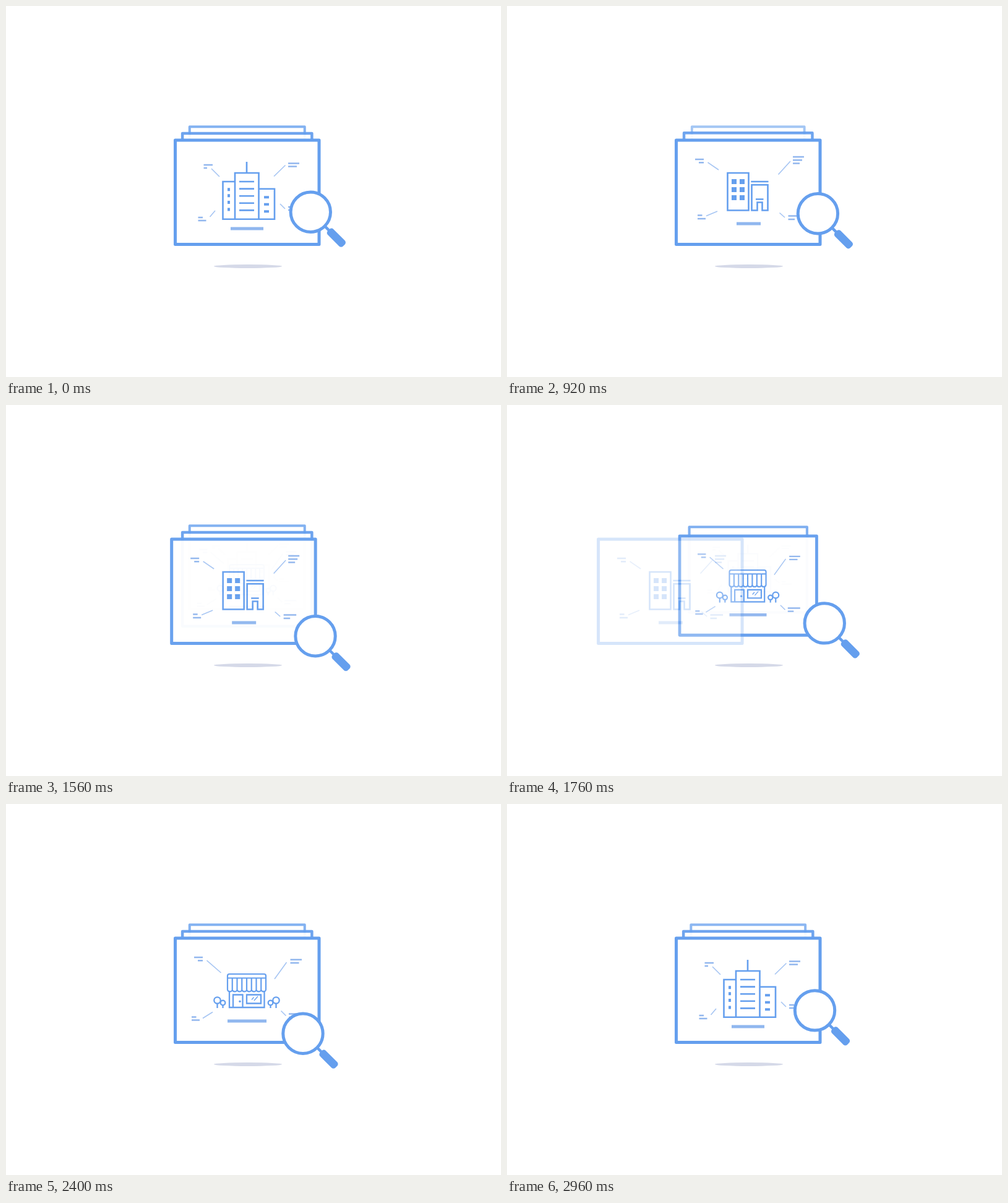
Write an HTML page that moves like this. It is 800 by 600 pixels and loops after 3000 ms.

```html
<!DOCTYPE html>
<html lang="en">
<head>
<meta charset="utf-8">
<title>Browsing cards</title>
<style>
  html, body { margin: 0; width: 100%; height: 100%; overflow: hidden; background: #fff; }
  svg { display: block; }
  .ink { fill: none; stroke: #659fee; stroke-width: 2.6; }
  .fill { fill: #659fee; stroke: none; }
  .label { stroke: #92b7ee; stroke-width: 2.5; }
  .lead { stroke: #a6c5f3; stroke-width: 1.6; }
  .bar { stroke: #90b7ef; stroke-width: 5; }
</style>
</head>
<body>
<svg width="800" height="600" viewBox="0 0 800 600" class="ink">
  <defs>
    <path id="frame" d="M273.5 217H506V385.5H273.5Z" fill="#fff" stroke-width="5" stroke-linejoin="round"/>

    <g id="scene0">
      <path d="M370 284H350.5V344.7H434V295.7H408.5M370 344.7V270H408.5V344.7M389 252V270"/>
      <path d="M377 284h24m-24 11.6h24m-24 11.6h24m-24 11.6h24m-24 11.6h24"/>
      <path d="M360 294.3v5m0 5v5m0 5.7v5m0 6.5v5" stroke-width="4"/>
      <path d="M417 309.2h8m-8 11.5h8m-8 11.6h8" stroke-width="4"/>
      <path class="bar" d="M363 360H416"/>
      <path class="label" d="M319.5 257H334M319.5 262H325M456 254.5H474M456 259.5H470M310.5 342H318M310.5 347H323.5M456 325H464M456 330H475"/>
      <path class="lead" d="M332 263L345 276M451.5 257.5L433 275.5M338 331L329.5 341M443 320L451 328"/>
    </g>

    <g id="scene1">
      <path d="M356.5 270H390.5V330.5H356.5ZM404.5 330.5H395.5V289.3H421.5V330.5H412.5V317.5H404.5Z"/>
      <path d="M394.3 284H422.5M402 312.5H414.5"/>
      <path d="M363 284h8m5 0h8M363 297h8m5 0h8M363 310h8m5 0h8" stroke-width="8"/>
      <path class="bar" d="M371 352H410"/>
      <path class="label" d="M304 248H318M310 253.2H318M462 244H480M462 249.2H477M462 254.4H473M308 338.5H315.5M308 344H321M454.5 339.5H475M454.5 345H465"/>
      <path class="lead" d="M324.5 253L342 265M458 251L438.5 272.5M322 339.5L340 332M440.5 334.5L449 342"/>
    </g>

    <g id="scene2">
      <path id="awning" stroke-width="2.2"/>
      <path d="M361 302V329H417.5V302M367 329V308.5H382.5V329M389 308.5H412V322.5H389Z" stroke-width="2.3"/>
      <path d="M397 316.5l3.5-4M401 318l6-7" stroke-width="1.3"/>
      <circle class="fill" cx="378" cy="319.3" r="1.7"/>
      <g id="trees" stroke-width="2.3">
        <circle cx="341.5" cy="317.5" r="5.2"/>
        <circle cx="350.5" cy="321.5" r="3.8"/>
        <path d="M341.5 322.5V330M350.5 325V330"/>
      </g>
      <use href="#trees" transform="translate(778 0) scale(-1 1)"/>
      <path class="bar" d="M358 351H421"/>
      <path class="label" d="M304 248H318M310 253.2H318M459.5 251.8H478M459.5 257H473.5M300 344.5H307.5M300 349.6H313M457 339.5H478M457 345H467"/>
      <path class="lead" d="M324.5 253L347.5 273M453.5 256L434 283M334 336.5L318 346.5M444.5 334.5L452.5 342.5"/>
    </g>
  </defs>

  <ellipse cx="391" cy="421" rx="55" ry="3" fill="#d5d9e8" stroke="none"/>
  <g id="cards"></g>
  <g id="lens">
    <path d="M22 22L31 31" stroke-width="4.5"/>
    <circle r="32.2" fill="#fff" stroke-width="5"/>
    <rect class="fill" x="41.2" y="-6.5" width="35" height="13" rx="4.5" transform="rotate(45)"/>
  </g>
</svg>
<script>
const CYCLE = 1000, STEP = 40, COUNT = 3;
const $ = id => document.getElementById(id);
const mix = (a, b, k) => a + (b - a) * k;

// Eased progress of p from start to end
function ease(p, start, end) {
  const u = Math.min(1, Math.max(0, (p - start) / (end - start)));
  return u * u * (3 - 2 * u);
}

// Striped awning with scalloped hem
const w = 7.75;
let hem = 'M358 281.5V278Q358 275 361 275H417Q420 275 420 278V281.5H358';
for (let i = 0; i < 8; i++) {
  const x = 358 + i * w;
  hem += `M${x} 281.5V300A${w / 2} 3.4 0 0 0 ${x + w} 300V281.5`;
}
$('awning').setAttribute('d', hem);

// Back to front: incoming, third, second, front
$('cards').innerHTML = '<g><use href="#frame"/><use/></g>'.repeat(4);
const slots = [...$('cards').children];

// Resting places in the stack: scale, top edge, opacity
const BIRTH = [.73, 195.3, 0], THIRD = [.8, 195.3, .8], SECOND = [.9, 206, .94], FRONT = [1, 217, 1];

function place(slot, from, to, k, scene) {
  const [scale, top, alpha] = from.map((v, i) => mix(v, to[i], k));
  slot.setAttribute('transform', `translate(389.75 ${top}) scale(${scale}) translate(-389.75 -217)`);
  slot.setAttribute('opacity', alpha);
  if (scene !== undefined) slot.lastChild.setAttribute('href', '#scene' + scene % COUNT);
}

function draw(now) {
  const t = Math.floor(now / STEP) * STEP % (CYCLE * COUNT);
  const p = t % CYCLE, n = Math.floor(t / CYCLE);

  place(slots[0], BIRTH, THIRD, ease(p, 760, 1000));
  place(slots[1], THIRD, SECOND, ease(p, 680, 970), n + 2);
  place(slots[2], SECOND, FRONT, ease(p, 600, 910), n + 1);
  place(slots[3], FRONT, FRONT, 0, n);
  const leave = ease(p, 520, 880);
  slots[3].setAttribute('transform', `translate(${-170 * leave} 0)`);
  slots[3].setAttribute('opacity', 1 - leave);

  const a = p / CYCLE * 2 * Math.PI;
  $('lens').setAttribute('transform', `translate(${492.3 - 21 * Math.sin(a)} ${354.2 - 21 * Math.cos(a)})`);
}

let origin;
function tick(now) {
  origin ??= now;
  draw(now - origin);
  requestAnimationFrame(tick);
}
draw(0);
requestAnimationFrame(tick);
</script>
</body>
</html>
```
